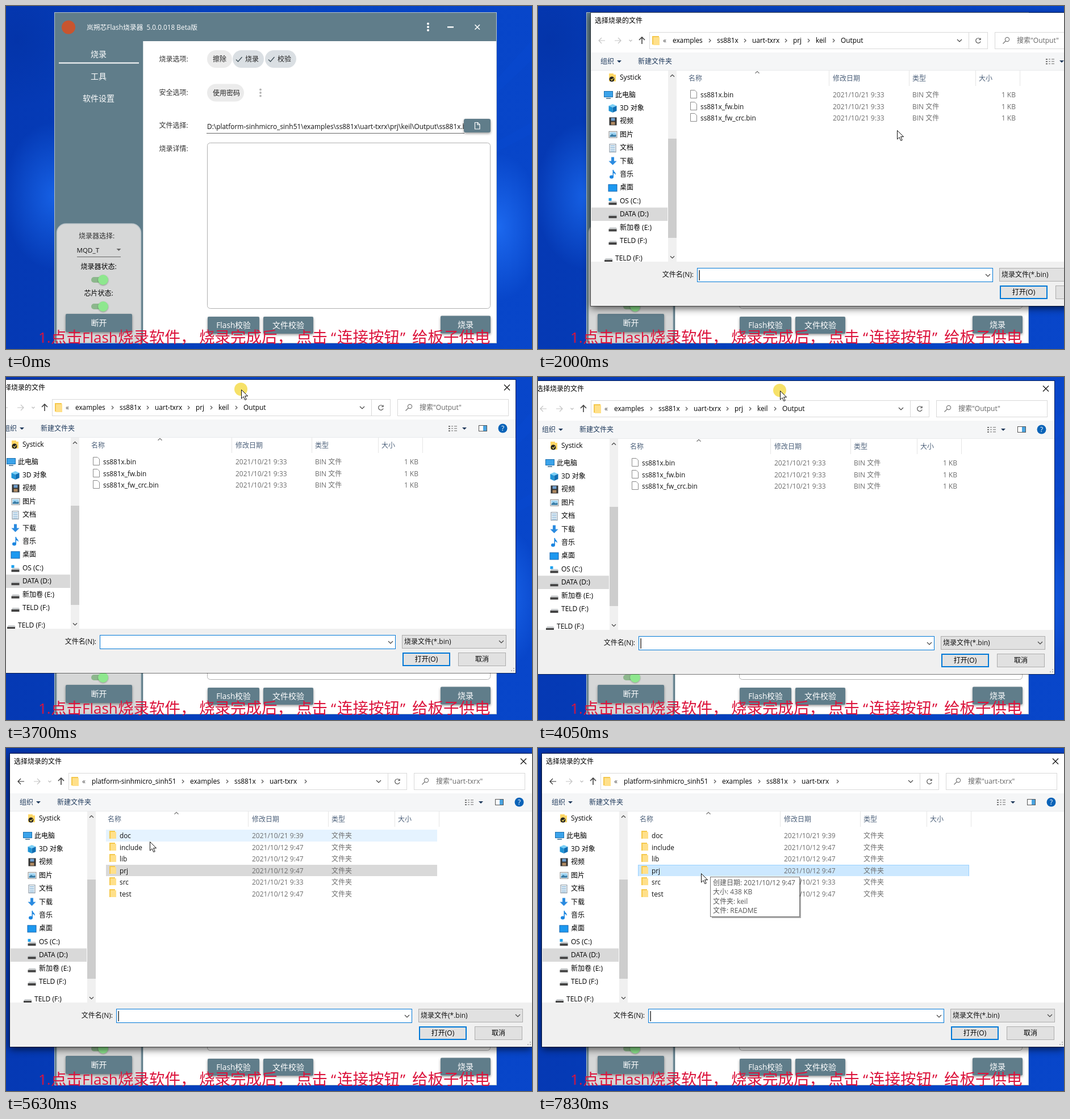
Write an HTML page that moves like this. It is 926x605 px and loops after 8 s.

```html
<!DOCTYPE html>
<html lang="zh-CN">
<head>
<meta charset="utf-8">
<title>Flash 烧录</title>
<style>
html, body { margin: 0; width: 100%; height: 100%; overflow: hidden; background: #0540bd; }
svg { display: block; width: 926px; height: 605px; }
text { font: 12px 'Open Sans', 'Noto Sans CJK SC', 'Noto Sans CJK', sans-serif; white-space: pre; }
.btn { fill: #607d8a; filter: drop-shadow(0 2px 2px #0006); }
.raised { filter: drop-shadow(0 2px 3px #0009); }
.line { fill: none; stroke-width: 1.2; }
#shade { filter: drop-shadow(0 4px 7px #000a); }
</style>
</head>
<body>
<svg id="stage" viewBox="0 0 926 605"></svg>
<script>
const LOOP = 8000, STEP = 69.45, START = 250, LAST = 7830;
const OPEN = 1775, NAV = 5220, TIP = 7600;

// Markup helpers
const text = (x, y, s, fill = '#000', size = 12, anchor = 'start') =>
  `<text x="${x}" y="${y}" fill="${fill}" style="font-size:${size}px" text-anchor="${anchor}">${s}</text>`;
const mid = (x, y, s, fill, size) => text(x, y, s, fill, size, 'middle');
const rect = (x, y, w, h, fill, more = '') =>
  `<rect x="${x}" y="${y}" width="${w}" height="${h}" fill="${fill}" ${more}/>`;
const box = (x, y, w, h, fill, stroke, more = '') =>
  rect(x + .5, y + .5, w - 1, h - 1, fill, `stroke="${stroke}" ${more}`);
const dot = (x, y, r, fill) => `<circle cx="${x}" cy="${y}" r="${r}" fill="${fill}"/>`;
const line = (d, stroke, more = '') => `<path class="line" d="${d}" stroke="${stroke}" ${more}/>`;
const shape = (d, fill) => `<path d="${d}" fill="${fill}"/>`;
const right = (x, y, c = '#555') => line(`M${x - 1.5} ${y - 3}l3 3-3 3`, c);
const down = (x, y, c = '#444', r = 4) => line(`M${x - r} ${y - r / 2}l${r} ${r} ${r} ${-r}`, c);
const up = (x, y, c = '#444', r = 4) => line(`M${x - r} ${y + r / 2}l${r} ${-r} ${r} ${r}`, c);
const drop = (x, y, c, r = 4) => shape(`M${x - r} ${y}h${2 * r}l${-r} ${r}z`, c);
const dots = (x, y, gap, r, c) => [-gap, 0, gap].map(d => dot(x, y + d, r, c)).join('');
const button = (x, y, w, h, label, size = 14) =>
  rect(x, y, w, h, '', 'rx="2" class="btn"') + mid(x + w / 2, y + h / 2 + 5, label, '#fff', size);

function wallpaper() {
  const glow = (id, c) => `<radialGradient id="${id}"><stop stop-color="${c}"/>
    <stop offset="1" stop-color="${c}" stop-opacity="0"/></radialGradient>`;
  return `<defs><linearGradient id="sky"><stop stop-color="#0539b4"/><stop offset=".5" stop-color="#0442bf"/>
    <stop offset="1" stop-color="#0846ca"/></linearGradient>${glow('g1', '#1660e4')}${glow('g2', '#1c68ee')}${glow('g3', '#0331a2')}</defs>
    ${rect(0, 0, 926, 605, 'url(#sky)')}
    <ellipse cx="20" cy="60" rx="110" ry="120" fill="url(#g3)" opacity=".6"/>
    <ellipse cx="85" cy="335" rx="90" ry="130" fill="url(#g1)"/>
    <ellipse cx="868" cy="390" rx="75" ry="130" fill="url(#g2)"/>
    ${shape('M863 130L926 60V95L863 155z M863 240L926 205V225L863 258z', '#0a50d82e')}`;
}

function toggle(y) {
  return rect(150, y - 5, 28, 10, '#8db78d', 'rx="5"') +
    `<g style="filter:drop-shadow(0 1px 1px #0005)">${dot(171, y, 9, '#8ee78e')}</g>`;
}

function chip(x, y, w, label, on) {
  const cy = y + 15.5;
  return rect(x, y, w, 31, on ? '#dadfe3' : '#ebebeb', 'rx="15.5"') +
    (on ? line(`M${x + 6} ${cy + 1}l3.5 3.5 7-8`, '#37474f', 'stroke-width="1.6"') : '') +
    text(x + (on ? 22 : 10), cy + 4.5, label, '#222');
}

function app() {
  const labels = [['烧录选项:', 98], ['安全选项:', 157], ['文件选择:', 215], ['烧录详情:', 256]];
  return box(85, 11, 779, 584, '#fff', '#b4c3cc') +
    rect(86, 12, 777, 50, '#607d8a') + rect(86, 62, 155, 532, '#607d8a') +
    rect(241, 62, 1, 532, '#cfd8dc') +
    dot(110, 37.5, 12, '#c8552f') +
    text(142, 42, '岚朔芯Flash烧录器  5.0.0.018 Beta版', '#fff', 11.8) +
    dots(743, 37, 5.7, 2, '#fff') + rect(777, 36, 11, 2.4, '#fff') +
    line('M825.5 33l8.5 8.5m0-8.5l-8.5 8.5', '#fff', 'style="stroke-width:1.6"') +
    mid(163, 90, '烧录', '#fff', 14) + rect(93, 99.5, 141, 2, '#fff') +
    mid(163, 129, '工具', '#fff', 14) + mid(163, 168, '软件设置', '#fff', 14) +
    `<path d="M89.5 594V400a16 16 0 0 1 16-16h116a16 16 0 0 1 16 16V594z" fill="#d6d7d7" stroke="#b9c3c8" stroke-width="1.5"/>` +
    mid(159.5, 410, '烧录器选择:', '#333') + text(124.5, 435, 'MQD_T', '#111', 11.6) +
    drop(198.5, 428, '#666') + rect(125, 442, 77, 1, '#666') +
    mid(163, 464, '烧录器状态:') + toggle(483) + mid(163, 511, '芯片状态:') + toggle(530) +
    button(105, 543, 117, 32, '断开') +
    labels.map(([s, y]) => text(269.5, y, s, '#333')).join('') +
    chip(354, 78, 44, '擦除') + chip(399, 78, 55, '烧录', 1) + chip(456, 78, 55, '校验', 1) +
    chip(354, 137.5, 65, '使用密码') + dots(448, 153, 5.6, 1.9, '#b5b5b5') +
    `<svg x="353" y="200" width="453" height="24">${text(1, 17, 'D:\\platform-sinhmicro_sinh51\\examples\\ss881x\\uart-txrx\\prj\\keil\\Output\\ss881x.bin', '#111', 11.9)}</svg>` +
    rect(353, 224, 454, 1, '#666') +
    rect(806, 199, 47, 24, '', 'rx="3" class="btn" id="pick"') +
    line('M825.5 205.5h5l3.5 3.5v8h-8.5zM830 205.5v4h4', '#fff') +
    box(354, 241, 499, 293, '#fff', '#b0b0b0', 'rx="5"') +
    button(355, 548, 91, 30, 'Flash校验', 13.7) + button(453, 548, 88, 30, '文件校验') +
    button(765, 546.5, 88, 31, '烧录');
}

// Navigation pane icons, centred on (x, y)
const icons = {
  folder: (x, y) => shape(`M${x - 6} ${y - 7}h8v2h4v12h-12z`, '#ffd766') + dot(x - 1, y + 3, 4.5, '#222') +
    line(`M${x - 3} ${y + 3}l2 2 3-4`, '#ffe45c'),
  pc: (x, y) => box(x - 8, y - 7, 16, 11, '#3ba3ea', '#1b6fae') + rect(x - 4, y + 5, 8, 2, '#6b8ba4'),
  cube: (x, y) => shape(`M${x - 7} ${y - 4}l7-3 7 3-7 3z`, '#7cd0f7') +
    shape(`M${x - 7} ${y - 4}l7 3v9l-7-3z`, '#1f94d6') + shape(`M${x + 7} ${y - 4}l-7 3v9l7-3z`, '#0f6fb4'),
  film: (x, y) => rect(x - 6, y - 7, 13, 14, '#333') + rect(x - 3, y - 6, 7, 5, '#6fa0d0') +
    rect(x - 3, y + 1, 7, 5, '#b08a62'),
  image: (x, y) => box(x - 7, y - 6, 15, 12, '#fff', '#888') + rect(x - 5, y - 4, 11, 8, '#9fd4f2') +
    shape(`M${x - 5} ${y + 4}v-2l4-3 3 2 4-1v4z`, '#3a7ca5'),
  doc: (x, y) => box(x - 6, y - 7, 12, 15, '#fff', '#7a8a99') +
    [-4, -1, 2, 5].map(d => rect(x - 4, y + d, 8, 1, '#4d8fc4')).join(''),
  arrow: (x, y) => shape(`M${x - 2.5} ${y - 7}h5v7h4.5l-7 7-7-7h4.5z`, '#2b8be0'),
  note: (x, y) => `<ellipse cx="${x - 2}" cy="${y + 4.5}" rx="3.5" ry="3" fill="#1c86e0"/>` +
    shape(`M${x} ${y - 8}h1.5c0 4 5 4 3.5 9-1-3-3-3-3.5-3v7h-1.5z`, '#1c86e0'),
  desk: (x, y) => box(x - 8, y - 6, 16, 13, '#1c98f0', '#1565b0'),
  disk: (x, y) => shape(`M${x - 5} ${y}h11l2 3h-15z`, '#c9ccce') + rect(x - 7, y + 3, 14, 4, '#444'),
  system: (x, y) => rect(x - 7, y - 5, 5, 5, '#1aa0ee') + icons.disk(x, y)
};

function pane() {
  const items = [['3D 对象', 'cube'], ['视频', 'film'], ['图片', 'image'], ['文档', 'doc'], ['下载', 'arrow'],
    ['音乐', 'note'], ['桌面', 'desk'], ['OS (C:)', 'system'], ['DATA (D:)', 'disk'], ['新加卷 (E:)', 'disk'], ['TELD (F:)', 'disk']];
  return rect(8, 353.5, 134, 23.5, '#d9d9d9') +
    icons.folder(45, 124) + text(58, 128, 'Systick') + icons.pc(38, 155) + text(50, 159, '此电脑') +
    items.map(([s, k], i) => icons[k](45.5, 178 + 23.4 * i) + text(58, 182 + 23.4 * i, s)).join('') +
    icons.disk(38, 443) + text(50, 447, 'TELD (F:)') +
    rect(143, 112, 15, 337, '#f0f0f0') + rect(143, 232, 15, 175, '#cdcdcd') + up(150.5, 121, '#444', 3.5) + down(150.5, 441, '#444', 3.5);
}

const rowTop = i => 144.5 + 20.5 * i;
const views = [
  { find: 'Output', end: 490,
    crumbs: [[151, 'examples'], [229, 'ss881x'], [291, 'uart-txrx'], [363, 'prj'], [403, 'keil'], [447, 'Output']],
    rows: ['ss881x.bin', 'ss881x_fw.bin', 'ss881x_fw_crc.bin'].map(n => [n, '2021/10/21 9:33']) },
  { find: 'uart-txrx', end: 536, folders: true,
    crumbs: [[151, 'platform-sinhmicro_sinh51'], [324, 'examples'], [402, 'ss881x'], [464, 'uart-txrx']],
    rows: ['doc', 'include', 'lib', 'prj', 'src', 'test'].map((n, i) =>
      [n, '2021/10/' + ['21 9:39', '12 9:47', '12 9:47', '12 9:47', '21 9:33', '12 9:47'][i]]) }
];
const crumbEnd = (v, i) => i + 1 < v.crumbs.length ? v.crumbs[i + 1][0] - 4 : v.end;

function view(v, n) {
  const crumbs = v.crumbs.map(([x, s], i) => {
    const end = crumbEnd(v, i), w = end - x + 4, split = n || i < v.crumbs.length - 1;
    return `<g id="c${n}${i}">${box(x - 4, 45, w, 29, '#cce8ff', '#99d1ff')}
      ${split ? rect(end - 16, 45, 1, 29, '#99d1ff') : ''}</g>` + text(x, 62.5, s, '#000', 11.85) +
      (split ? `<g id="r${n}${i}">${right(end - 8.5, 59)}</g><g id="d${n}${i}">${down(end - 8, 59, '#555', 3)}</g>` : '');
  });
  const rows = v.rows.map(([name, date], i) => {
    const y = rowTop(i), base = y + 14.5, top = Math.floor(y);
    const icon = v.folders
      ? shape(`M182 ${top + 2}h10v2h2v12h-12z`, '#f5c84c') + rect(184, top + 4, 10, 12, '#ffe08a')
      : `<path d="M182.5 ${top + 2.5}h7.5l3.5 3.5v10.5h-11z" fill="#fff" stroke="#8a8a8a"/>`;
    return box(176, top, 583, 21, '#fff', 'none', `id="w${n}${i}"`) + icon + text(200, base, name, '#111', 11.8) +
      text(433, base, date, '#6d6d6d') + text(573, base, v.folders ? '文件夹' : 'BIN 文件', '#6d6d6d') +
      (v.folders ? '' : text(755, base, '1 KB', '#6d6d6d', 12, 'end'));
  });
  return `<g id="v${n}">` + crumbs.join('') + rows.join('') + text(757, 63, `搜索"${v.find}"`, '#666') +
    line('M32 59h-11m5-5l-5 5 5 5', n ? '#333' : '#c4c4c4') + '</g>';
}

function dialog() {
  const heads = [['名称', 179], ['修改日期', 433], ['类型', 573], ['大小', 690]];
  const tips = ['创建日期: 2021/10/12 9:47', '大小: 438 KB', '文件夹: keil', '文件: README'];
  return `<g id="dialog">${rect(7, 10, 919, 517, '#fff', 'id="shade"')}` + box(6, 9, 921, 519, 'none', '#0008') +
    text(14, 28, '选择烧录的文件') + line('M906 18.5l10 10m0-10l-10 10', '#111') +
    line('M49 59h11m-5-5l5 5-5 5', '#c4c4c4') + down(77, 59, '#bbb', 2.5) + line('M97 65v-12m-5 5l5-5 5 5', '#444', 'style="stroke-width:1.6"') +
    box(110, 44, 596, 30, '#fff', '#d9d9d9') + rect(672, 45, 1, 28, '#d9d9d9') + box(718, 44, 196, 30, '#fff', '#d9d9d9') +
    rect(115, 51, 12, 15, '#f5c84c') + rect(117, 53, 11, 14, '#ffe08a') + text(134, 62.5, '«', '#444') +
    down(656, 59) + line('M692.5 56.5a4.3 4.3 0 1 0 .6 4m0-6v3h-3', '#555') +
    `<circle class="line" cx="740" cy="57" r="3.6" stroke="#777"/>` + line('M737.5 59.5l-5 5', '#777') +
    rect(7, 80, 919, 31, '#f5f6f7') + rect(7, 111, 919, 1, '#e8eaec') +
    text(24, 100, '组织', '#1e395b') + drop(57, 94, '#1e395b') + text(90, 100, '新建文件夹', '#1e395b') +
    [91, 95, 99].map(y => rect(808, y, 3, 2, '#777') + rect(813, y, 3, 1.5, '#999') + rect(818, y, 5, 1.5, '#999')).join('') +
    drop(836, 94, '#1e395b') + box(861, 90, 15, 11, '#fff', '#555') + rect(869, 91, 6, 9, '#4aa3df') +
    dot(903.5, 95.5, 8, '#0a63b8') + `<g font-weight="bold">${mid(903.5, 100, '?', '#fff', 12)}</g>` + pane() +
    heads.map(([s, x]) => text(x, 129.5, s, '#4c607a')).join('') + up(300, 115, '#777', 3.5) +
    [426, 567, 684, 762].map(x => rect(x, 112, 1, 27, '#e5e5e5')).join('') + views.map(view).join('') +
    rect(7, 449, 919, 78, '#f0f0f0') + text(188, 476, '文件名(N):', '#111', 12, 'end') +
    box(194, 460, 521, 25, '#fff', '#0078d7') + rect(197.5, 464, 1.2, 18, '#000', 'id="caret"') + down(706, 473) +
    box(726, 460, 184, 24, '#e1e1e1', '#adadad') + text(730, 476, '烧录文件(*.bin)', '#111') + down(901, 472) +
    rect(728, 492, 82, 22, '#e1e1e1', 'stroke="#0078d7" stroke-width="2"') + mid(769, 507, '打开(O)') +
    box(825, 491, 84, 24, '#e1e1e1', '#adadad') + mid(867, 507, '取消') +
    [[922, 518], [922, 522], [918, 522]].map(([x, y]) => rect(x, y, 2, 2, '#b5b5b5')).join('') +
    `<g id="tip">${rect(306, 230, 157, 70, '#0005')}${box(303, 227, 158, 71, '#fff', '#767676')}` +
    tips.map((s, i) => text(308, 241.5 + 16.6 * i, s, '#575757')).join('') + '</g></g>';
}

function caption() {
  const parts = [[57, '1.', 26], [79, '点击'], [134, 'Flash', 26], [197, '烧录软件，'], [340, '烧录完成后，'],
    [511, '点击'], [572, '“', 26], [583, '连接按钮'], [694, '”', 26], [715, '给板子供电']];
  return parts.map(([x, s, size = 27.5]) => text(x, 594, s, '#dc143c', size)).join('');
}

const cursor = `<g id="cursor"><circle id="press" r="11.5" cx="-.5" cy="-.5" fill="#f0cf0c" fill-opacity=".62"/>
  <path d="M.5 .5v15.5l3.6-3.4 2.7 5.9 2.4-1-2.6-5.9h5z" fill="#fff" stroke="#111"/></g>`;

const stage = document.getElementById('stage');
stage.innerHTML = wallpaper() + app() + dialog() + cursor + caption();
const el = id => document.getElementById(id);
const show = (id, on) => el(id).setAttribute('opacity', +on);

// Tracks hold [ms, x, y]
const pointerKeys = [[250, 896, 600], [560, 880, 430], [1000, 820, 211], [1300, 820, 211], [1709, 706, 211],
  [2070, 610, 222], [2350, 575, 185], [2560, 560, 110], [2680, 556, 60], [2780, 508, 56], [2885, 532, 40],
  [2970, 529, 29], [3030, 529, 29], [3600, 414, 22], [3830, 414, 22], [4250, 443, 27], [4320, 443, 27],
  [4590, 387, 64], [4860, 320, 57], [5220, 320, 57], [5760, 224, 211], [5970, 226, 217], [6150, 226, 217],
  [6290, 354, 102], [6460, 480, 58], [6940, 360, 62], [7040, 340, 70], [7200, 166, 190], [7400, 270, 216],
  [7740, 289, 219], [7815, 287, 221]];
const dialogKeys = [[0, 86, 2], [3030, 86, 2], [3600, -29, -5], [3830, -29, -5], [4250, 0, 0]];
const presses = [[1080, 1220], [3030, 4290], [5000, 5130]];

function at(keys, t) {
  const i = keys.findIndex(k => k[0] > t);
  if (i < 0) return keys[keys.length - 1].slice(1);
  if (!i) return keys[0].slice(1);
  const [a, b] = [keys[i - 1], keys[i]], f = (t - a[0]) / (b[0] - a[0]);
  return [a[1] + (b[1] - a[1]) * f, a[2] + (b[2] - a[2]) * f];
}

function local(t) {
  const [x, y] = at(pointerKeys, t), [dx, dy] = at(dialogKeys, t);
  return [x - dx, y - dy];
}

// Crumb highlights fade over a few steps after the pointer leaves
function crumbHeat(v, i, t, since) {
  for (const [j, heat] of [1, .6, .4, .2].entries()) {
    const past = t - j * STEP, [x, y] = local(past);
    if (past >= since && y > 45 && y < 74 && x >= v.crumbs[i][0] - 4 && x < crumbEnd(v, i)) return heat;
  }
  return 0;
}

function paint(t) {
  const n = +(t >= NAV), v = views[n], [px, py] = at(pointerKeys, t), [dx, dy] = at(dialogKeys, t);
  show('dialog', t < OPEN ? 0 : Math.min(1, (t - OPEN + 70) / 200));
  el('dialog').setAttribute('transform', `translate(${Math.round(dx)} ${Math.round(dy)})`);
  el('shade').style.filter = t > 3030 && t < 4290 ? 'none' : '';
  el('pick').setAttribute('class', t > 930 ? 'btn raised' : 'btn');
  el('cursor').setAttribute('transform', `translate(${Math.round(px)} ${Math.round(py)})`);
  show('cursor', t >= START);
  show('press', presses.some(([a, b]) => t >= a && t < b));
  show('v0', !n);
  show('v1', n);
  v.crumbs.forEach((c, i) => {
    const heat = crumbHeat(v, i, t, n ? NAV : OPEN);
    show(`c${n}${i}`, heat);
    if (el(`r${n}${i}`)) {
      show(`r${n}${i}`, heat < 1);
      show(`d${n}${i}`, heat === 1);
    }
  });
  const [x, y] = local(t);
  v.rows.forEach((r, i) => {
    const hot = x > 176 && x < 759 && y >= rowTop(i) && y < rowTop(i + 1), chosen = n && i === 3;
    const row = el(`w${n}${i}`), fill = chosen ? (hot ? '#cce8ff' : '#d9d9d9') : hot ? '#e5f3ff' : '#fff';
    row.setAttribute('fill', fill);
    row.setAttribute('stroke', chosen && hot ? '#99d1ff' : fill);
  });
  show('caret', (t + 1060 - (n ? 980 : 740)) % 1060 < 530);
  show('tip', t >= TIP);
}

function frame(now) {
  const t = Math.min(now % LOOP, LAST);
  paint(t < START ? 0 : START + Math.floor((t - START) / STEP) * STEP);
  requestAnimationFrame(frame);
}
requestAnimationFrame(frame);
</script>
</body>
</html>
```
